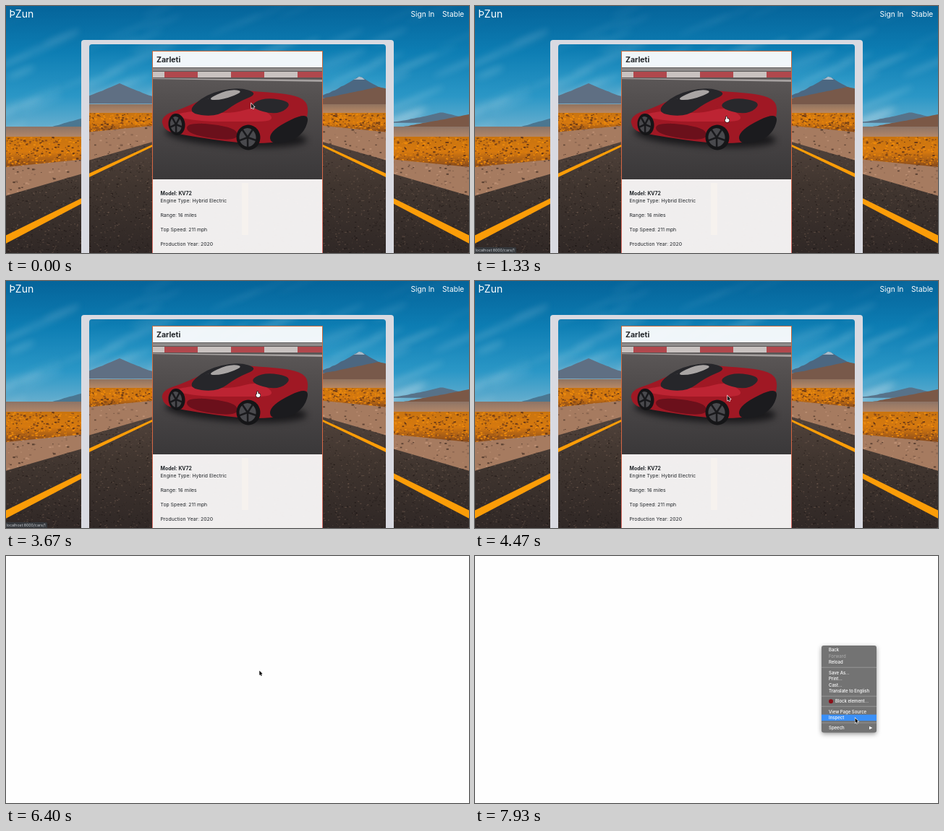
These frames come from a looping animation (640x342 px, 8000 ms). An HTML page with a canvas:

```html
<!DOCTYPE html>
<html lang="en">
<head>
<meta charset="utf-8">
<title>Car page</title>
<style>
html, body { margin: 0; width: 100%; height: 100%; overflow: hidden; background: #fefefe; }
canvas { display: block; width: 640px; height: 342px; }
</style>
</head>
<body>
<canvas id="stage" width="640" height="342"></canvas>
<script>
const W = 640, H = 342, LOOP = 8000, STEP = 200 / 3;
const SANS = 'Inter, "Open Sans", sans-serif';
const screen = document.getElementById('stage').getContext('2d');
const page = document.createElement('canvas');
page.width = W;
page.height = H;
let g = page.getContext('2d');

let seed = 7;
function rnd() {
  seed = (seed * 16807) % 2147483647;
  return seed / 2147483647;
}

const mix = (a, b, p) => a + (b - a) * p;

function ease(t, from, to) {
  const p = Math.min(1, Math.max(0, (t - from) / (to - from)));
  return p * p * (3 - 2 * p);
}

function rect(x, y, w, h, fill) {
  g.fillStyle = fill;
  g.fillRect(x, y, w, h);
}

function oval(x, y, rx, ry, fill, turn = 0) {
  g.fillStyle = fill;
  g.beginPath();
  g.ellipse(x, y, rx, ry, turn, 0, Math.PI * 2);
  g.fill();
}

function round(x, y, w, h, r, fill) {
  g.fillStyle = fill;
  g.beginPath();
  g.roundRect(x, y, w, h, r);
  g.fill();
}

function poly(fill, ...p) {
  g.fillStyle = fill;
  g.beginPath();
  for (let i = 0; i < p.length; i += 2) g.lineTo(p[i], p[i + 1]);
  g.closePath();
  g.fill();
}

// Closed curve guided by a few corner points
function blob(fill, ...p) {
  const n = p.length;
  g.fillStyle = fill;
  g.beginPath();
  for (let i = 0; i <= n; i += 2) {
    const x = p[i % n], y = p[(i + 1) % n];
    g.quadraticCurveTo(x, y, mix(x, p[(i + 2) % n], 0.5), mix(y, p[(i + 3) % n], 0.5));
  }
  g.fill();
}

function text(str, x, y, size, color, weight = 400) {
  g.font = `${weight} ${size}px ${SANS}`;
  g.fillStyle = color;
  g.fillText(str, x, y);
}

function fade(y0, y1, ...colors) {
  const f = g.createLinearGradient(0, y0, 0, y1);
  colors.forEach((c, i) => f.addColorStop(i / (colors.length - 1), c));
  return f;
}

function clip(x, y, w, h, r, draw) {
  g.save();
  g.beginPath();
  g.roundRect(x, y, w, h, r);
  g.clip();
  draw();
  g.restore();
}

function specks(n, y, h, size, ...colors) {
  for (let i = 0; i < n; i++) {
    const s = size * (0.4 + rnd());
    rect(rnd() * W, y + rnd() * h, s * 1.6, s, colors[i % colors.length]);
  }
}

function sky(top, bottom) {
  rect(0, top, W, bottom - top, fade(top, bottom, '#05649a', '#0d7db3', '#2b97c6', '#82b9d2'));
  g.filter = 'blur(4px)';
  for (let i = 0; i < 60; i++) {
    const x = W * rnd() ** 1.6, p = rnd();
    oval(x, mix(top, bottom, p), 20 + rnd() * 40, 1 + rnd() * 4, `rgba(190,222,235,${0.05 + 0.3 * p})`, -0.4);
  }
  g.filter = 'none';
}

function peak(x, top, half, base, fill) {
  g.fillStyle = fill;
  g.beginPath();
  for (let d = -half; d <= half; d += 4) {
    const h = (1 - Math.abs(d) / half) ** 1.25;
    g.lineTo(x + d, mix(base, top, h) - rnd() * 1.5 * (1 - h));
  }
  g.fill();
}

// Everything below two lines that fall away from the centre axis
function wedge(y, slope, fill, draw) {
  g.save();
  g.beginPath();
  for (const x of [-80, 320, 720]) g.lineTo(x, y + Math.abs(x - 320) * slope);
  g.lineTo(720, H);
  g.lineTo(-80, H);
  g.clip();
  rect(0, 0, W, H, fill);
  draw();
  g.restore();
}

function ground(top, deep, dirt, road, line, slope, thick) {
  rect(0, top, W, H - top, fade(top, top + deep, '#c9740f', '#d6790f', '#86491b'));
  specks(2200, top, deep, 1.5, '#f08c0a', '#6b3a16', '#dc7d0c', '#8d4c18', '#e98a12');
  wedge(dirt, 0.1, '#a67b60', () => specks(1500, top, H - top, 1.6, '#5d4334', '#bd9074', '#8b6650'));
  wedge(road, 0.29, fade(road, H, '#5a4a42', '#40352f', '#302826'), () =>
    specks(5000, top, H - top, 1, 'rgba(10,5,5,.35)', 'rgba(160,130,110,.3)'));
  for (const x of [-80, 720])
    poly('#fb9d08', 320, line, x, line + 400 * slope - thick, x, line + 400 * slope + thick);
}

function outerScene() {
  sky(0, 188);
  peak(120, 151, 100, 176, '#4b7690');
  peak(602, 147, 70, 162, '#577289');
  peak(640, 150, 220, 186, '#7b5846');
  rect(0, 167, W, 18, fade(167, 184, '#8d7466', '#b98a69'));
  ground(181, 42, 191, 170, 160, 0.51, 7);
}

function innerScene() {
  sky(20, 142);
  peak(157, 107, 80, 136, '#5f6f83');
  peak(489, 97, 62, 128, '#4c6781');
  peak(489, 97, 9, 103, '#a9bccb');
  peak(515, 112, 180, 144, '#78594a');
  rect(115, 136, 410, 14, fade(136, 150, '#90735f', '#bd8c67'));
  ground(148, 27, 154, 154, 138, 0.47, 5);
  rect(326, 245, 9, 72, '#d89a2b');
}

function wheel(x, y, rx, ry) {
  oval(x, y, rx, ry, '#151517', -0.12);
  oval(x - 1, y, rx * 0.7, ry * 0.74, '#49494d', -0.12);
  g.strokeStyle = '#19191c';
  g.lineWidth = 2.5;
  for (let a = 0.3; a < 6; a += Math.PI * 0.4) {
    g.beginPath();
    g.moveTo(x - 1, y);
    g.lineTo(x - 1 + Math.cos(a) * rx * 0.75, y + Math.sin(a) * ry * 0.78);
    g.stroke();
  }
}

function photo() {
  rect(203, 85, 235, 155, fade(85, 240, '#5f5b5b', '#514d4d', '#454243', '#3a3839'));
  rect(203, 86, 235, 4, '#8f8c8b');
  rect(203, 91, 235, 8, '#c9c2c0');
  for (let x = 219; x < 438; x += 92) rect(x, 91, 46, 8, '#b0484d');
  poly('#a5a09f', 203, 100, 438, 102, 438, 105, 203, 101);
  g.filter = 'blur(4px)';
  oval(318, 180, 98, 15, 'rgba(15,15,18,.8)', 0.06);
  g.filter = 'none';

  blob('#a01824', 214, 152, 250, 140, 300, 115, 345, 118, 412, 124, 420, 150, 400, 186, 335, 192, 240, 178, 218, 172);
  blob('#bd2433', 226, 152, 262, 144, 310, 150, 350, 138, 376, 160, 320, 160, 270, 160);
  blob('#6b101b', 250, 160, 320, 168, 320, 188, 250, 178);
  blob('#26262a', 248, 148, 276, 122, 320, 112, 350, 121, 318, 134, 292, 154);
  blob('#a9a5a4', 276, 130, 308, 115, 330, 118, 300, 130);
  blob('#28282c', 334, 140, 356, 126, 398, 133, 376, 152);
  blob('#1b1b1e', 364, 172, 422, 144, 410, 182, 366, 194);
  wheel(236, 164, 11.5, 15);
  wheel(335, 182, 16.5, 17.5);
}

function buildPage() {
  outerScene();
  round(104, 47, 432, 310, 4, '#d9dae1');
  clip(115, 53, 410, 310, 4, innerScene);

  rect(202, 62, 236, 23, 'rgba(252,252,253,.95)');
  rect(202, 240, 236, 102, 'rgba(248,246,246,.96)');
  clip(203, 85, 235, 155, 0, photo);
  g.strokeStyle = fade(62, 342, '#c96a3c', '#d4653f', '#d9706a');
  g.lineWidth = 1;
  g.strokeRect(202.5, 62.5, 235, 300);

  text('ÞZun', 4.5, 15.5, 14, '#fff');
  text('Sign In', 559.5, 15, 10.2, '#fff');
  text('Stable', 603, 15, 10.2, '#fff');
  text('Zarleti', 208, 77.5, 10.5, '#212529', 700);
  text('Model: KV72', 213.5, 262, 6.9, '#212529', 700);
  ['Engine Type: Hybrid Electric', 'Range: 16 miles', 'Top Speed: 211 mph', 'Production Year: 2020']
    .forEach((s, i) => text(s, 213.5, 272.3 + i * 19.8, 6.85, '#212529'));
}

function status() {
  round(-3, 334, 60, 11, 2, '#35383c');
  text('localhost:8000/cars/1', 0.5, 340, 5.3, '#c9ccd0');
}

function arrow(x, y) {
  g.beginPath();
  [[0, 0], [0, 6.4], [1.4, 5.2], [2.4, 7.4], [3.4, 6.9], [2.5, 4.8], [4.4, 4.6]]
    .forEach(([a, b]) => g.lineTo(x + a, y + b));
  g.closePath();
  g.strokeStyle = '#fff';
  g.lineWidth = 1.2;
  g.stroke();
  g.fillStyle = '#0b0b0b';
  g.fill();
}

function hand(x, y) {
  for (const [pad, fill] of [[0.6, '#111'], [0, '#fff']]) {
    round(x - pad, y - pad, 1.4 + pad * 2, 5 + pad * 2, 0.8, fill);
    oval(x + 1.6, y + 5.3, 2.8 + pad, 2.6 + pad, fill);
  }
}

const groups = [
  ['Back', 'Forward', 'Reload'],
  ['Save As...', 'Print...', 'Cast...', 'Translate to English'],
  ['Block element...'],
  ['View Page Source', 'Inspect'],
  ['Speech']
];

function menu(pointer) {
  const row = 8.6, gap = 5.5;
  g.save();
  g.shadowColor = 'rgba(0,0,0,.4)';
  g.shadowBlur = 6;
  g.shadowOffsetY = 2;
  round(479, 124, 76, 120.5, 3, '#737373');
  g.restore();
  let y = 130;
  groups.forEach((names, i) => {
    if (i) {
      rect(479, y - row / 2 - gap / 2 - 0.5, 76, 1, '#969696');
    }
    for (const name of names) {
      const off = name === 'Forward', block = name.startsWith('Block');
      if (!off && Math.abs(pointer - y) < row / 2) rect(479, y - row / 2, 76, row, '#3b90f7');
      if (block) oval(492, y, 3, 3, '#8c1019');
      text(name, block ? 498 : 489, y + 2.2, 6, off ? '#a6a6a6' : '#fff', 500);
      y += row;
    }
    y += gap;
  });
  poly('#fff', 545, 235.8, 549.4, 238, 545, 240.2);
}

function drawPage(t) {
  g.drawImage(page, 0, 0);
  const over = t >= 930 && t < 4000;
  if (over) status();
  const a = ease(t, 70, 930), b = ease(t, 3870, 4400);
  const x = mix(mix(339, 347, a), 349, b);
  const y = mix(mix(135, 153, a), 159, b);
  (over ? hand : arrow)(x, y);
}

function drawBlank(t) {
  rect(0, 0, W, H, '#fefefe');
  const a = ease(t, 6375, 6866), b = ease(t, 7465, 7930);
  const x = mix(mix(349.3, 480.5, a), 525.5, b);
  const y = mix(mix(159, 126.5, a), 224.5, b);
  if (t >= 7200) menu(t < 7530 ? 0 : y);
  arrow(x, y);
}

function frame(now) {
  const t = now % LOOP;
  // The picture advances fifteen times a second
  const held = Math.floor((t + 5) / STEP) * STEP;
  if (t < 4530) drawPage(held);
  else drawBlank(t >= 7200 && t < 7530 ? 7200 : held);
  requestAnimationFrame(frame);
}

buildPage();
g = screen;
frame(0);
</script>
</body>
</html>
```
